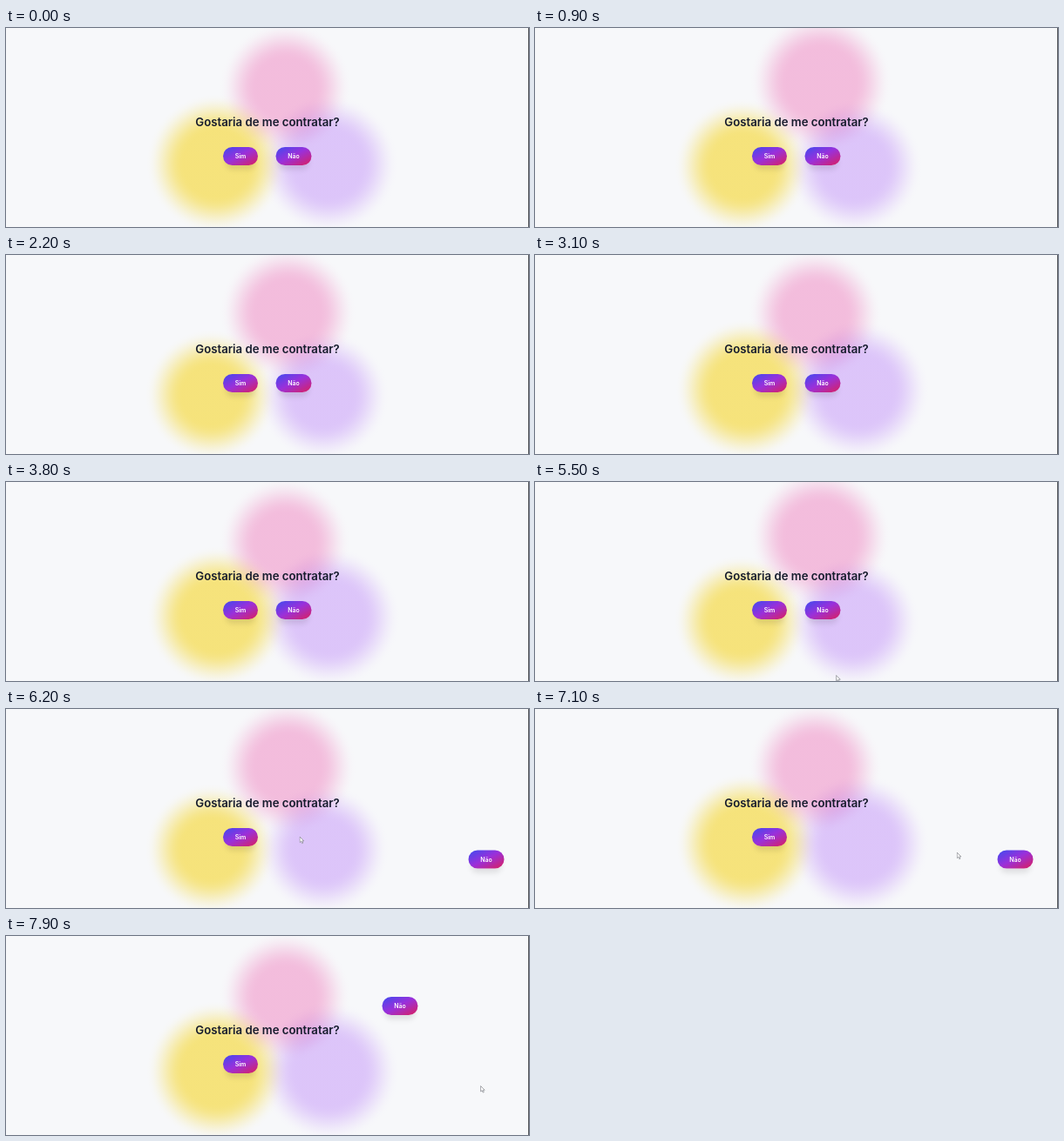
Recreate the animation shown at these times as an HTML page with a canvas. Size 600 by 229 pixels, loop 8000 ms.

```html
<!DOCTYPE html>
<html lang="pt-BR">
<head>
<meta charset="utf-8">
<title>Gostaria de me contratar?</title>
<style>
html, body { margin: 0; width: 100%; height: 100%; overflow: hidden; background: #f7f8fa; }
body { position: relative; font-family: Inter, "Open Sans", sans-serif; }
canvas { position: absolute; left: 0; top: 0; }
h1 {
  position: absolute; left: 0; top: 98px; width: 600px; margin: 0;
  font-size: 13.2px; line-height: 20px; font-weight: 600;
  text-align: center; white-space: nowrap; color: #161c2d;
}
.btn {
  position: absolute; left: 0; top: 0; height: 20.5px; border-radius: 11px;
  background: linear-gradient(to bottom right, #4648ee 4%, #9a30da 48%, #b02bb0 66%, #d81f62 98%);
  box-shadow: 0 8px 6px -3px rgba(0, 0, 0, .1);
  color: #fff; font-size: 7px; line-height: 21px; font-weight: 600; text-align: center;
}
#yes { width: 40px; transform: translate(249px, 137px); }
#no { width: 41px; }
#cursor { position: absolute; left: 0; top: 0; }
#edge { position: absolute; left: 599px; top: 0; width: 1px; height: 229px; background: #55585c; }
</style>
</head>
<body>
<canvas id="stage" width="600" height="229"></canvas>
<h1>Gostaria de me contratar?</h1>
<div class="btn" id="yes">Sim</div>
<div class="btn" id="no">Não</div>
<div id="edge"></div>
<svg id="cursor" width="7" height="10" viewBox="0 0 7 10">
  <path d="M.6 .6V7L2.1 5.7L3.2 8.1L4.3 7.6L3.2 5.3H5.2Z" fill="#fff" stroke="#6c6f76" stroke-width=".6" stroke-linejoin="round"/>
</svg>
<script>
const LOOP = 8000, DRIFT = 4000, RADIUS = 56.5, SOFT = 21;
const ctx = document.getElementById('stage').getContext('2d');
const no = document.getElementById('no');
const cursor = document.getElementById('cursor');

// All blobs share one drift through three poses; delay shifts its phase
const poses = [
  { x: 0, y: 0, scale: 1 },
  { x: -3, y: 2.5, scale: 0.955 },
  { x: 5.5, y: -5, scale: 1.07 }
];
const blobs = [
  { rgb: '253,224,71', x: 238, y: 159, delay: 733 },
  { rgb: '216,180,254', x: 366.8, y: 159.5, delay: 733 },
  { rgb: '249,168,212', x: 323, y: 67, delay: 2447 }
];

const clamp = u => Math.min(1, Math.max(0, u));
const ease = u => (1 - Math.cos(Math.PI * u)) / 2;
const mix = (a, b, u) => a + (b - a) * u;

function drawBlob({ rgb, x, y, delay }, t) {
  const phase = ((t - delay + LOOP) % DRIFT) / DRIFT * 3;
  const i = Math.floor(phase), u = ease(phase - i);
  const a = poses[i], b = poses[(i + 1) % 3];
  const cx = x + mix(a.x, b.x, u), cy = y + mix(a.y, b.y, u);
  const r = RADIUS * mix(a.scale, b.scale, u), outer = r + SOFT;

  const g = ctx.createRadialGradient(cx, cy, 0, cx, cy, outer);
  for (let k = 0; k <= 12; k++) {
    const s = k / 12, fade = 1 - s * s * (3 - 2 * s);
    g.addColorStop((r + SOFT * (2 * s - 1)) / outer, `rgba(${rgb},${0.7 * fade})`);
  }
  ctx.fillStyle = g;
  ctx.fillRect(cx - outer, cy - outer, outer * 2, outer * 2);
}

function place(el, x, y) {
  el.style.transform = `translate(${x}px, ${y}px)`;
}

// The pointer rises to the button, rests, then chases it to the right
function moveCursor(t) {
  const rise = ease(clamp((t - 5350) / 750));
  const chase = ease(clamp((t - 6400) / 1100));
  place(cursor, mix(mix(346, 336.5, rise), 544, chase), mix(mix(230, 146.5, rise), 172, chase));
}

function render(t) {
  ctx.globalCompositeOperation = 'source-over';
  ctx.fillStyle = '#f7f8fa';
  ctx.fillRect(0, 0, 600, 229);
  ctx.globalCompositeOperation = 'multiply';
  for (const b of blobs) drawBlob(b, t);

  if (t < 6000) place(no, 309.5, 137);
  else if (t < 7400) place(no, 530.5, 162.5);
  else place(no, 431.5, 70);
  moveCursor(t);
}

const start = performance.now();
function tick() {
  render((performance.now() - start) % LOOP);
  requestAnimationFrame(tick);
}
render(0);
requestAnimationFrame(tick);
</script>
</body>
</html>
```
